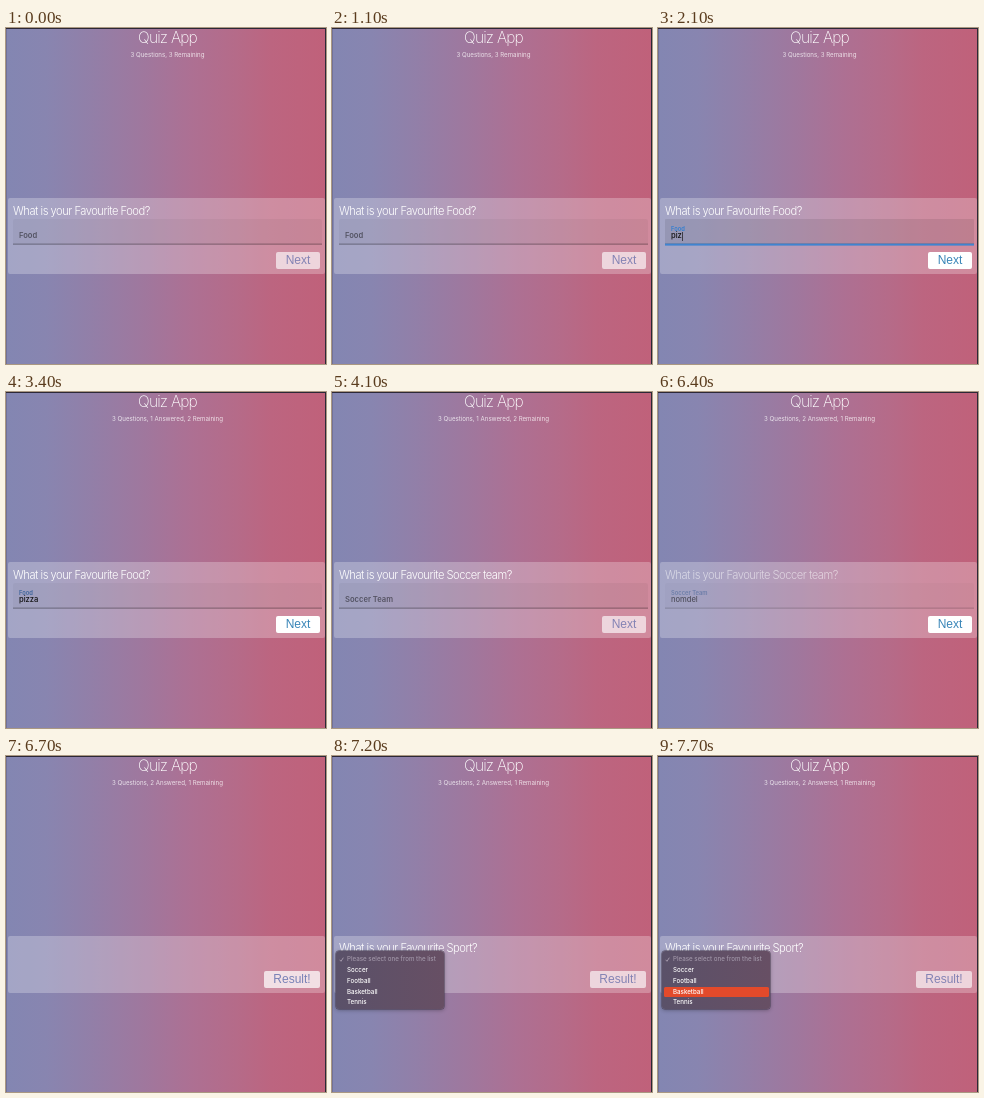
An HTML page for the animation above (8000 ms loop, 320 by 336 pixels).

```html
<!DOCTYPE html>
<html lang="en">
<head>
<meta charset="utf-8">
<title>Quiz App</title>
<style>
  html, body { margin: 0; width: 100%; height: 100%; overflow: hidden; }
  body { font-family: Inter, "Open Sans", sans-serif; color: #fff; }
  .stage {
    position: relative; width: 320px; height: 336px; overflow: hidden;
    background: linear-gradient(90deg, #8386b2 0, #8885b0 40px, #927fa8 85px, #a0779d 140px,
      #ad7093 185px, #b56b89 230px, #bc6580 265px, #c0617a 320px);
  }
  .edge { inset: 0; border: solid #2c2836; border-width: 1px 1px 0 0; box-shadow: inset 1px 0 #55526f66; }
  .stage * { position: absolute; white-space: pre; box-sizing: border-box; }
  h1, p { margin: 0; left: 0; width: 323px; text-align: center; }
  h1 { top: 0; font-size: 15.5px; line-height: 20px; font-weight: 200; letter-spacing: -.8px; }
  p { top: 21.5px; font-size: 6.15px; line-height: 10px; font-weight: 400; opacity: .78; }

  .card { left: 2px; top: 170px; width: 317px; height: 76px; border-radius: 2px; background: #ffffff42; }
  .card.short { top: 180px; height: 57px; }

  .scene { inset: 0; animation: 8s linear infinite; }
  .first { animation-name: first; }
  .second { animation-name: second; --delay: 2.85s; }
  .third { animation-name: third; }
  .ask { left: 7px; top: 176px; font-size: 11.2px; line-height: 14px; font-weight: 300; letter-spacing: -.5px; }
  .third .ask { top: 184.5px; }

  .field { left: 7px; top: 191px; width: 309px; height: 26px; background: #0000000a; border-radius: 2px 2px 0 0; }
  .field * { animation: 8s cubic-bezier(.25, .8, .25, 1) var(--delay, 0s) infinite backwards; }
  .tint { inset: 0; background: #000; opacity: 0; animation-name: tint; }
  .rule { left: 0; right: 0; top: 24px; height: 1px; background: #00000058; transform: translateY(.6px); }
  .focus { left: 0; right: 0; top: 24px; height: 2px; background: #3f84d0; opacity: 0; animation-name: focus; }
  .label, .answer { left: 6px; top: 11.5px; font-size: 7.6px; line-height: 10px; }
  .label { font-weight: 600; color: #0000007a; transform-origin: 0 50%; animation-name: float; }
  .answer { color: #111; font-weight: 500; letter-spacing: -.05px; }
  .answer.caret::after { content: ""; position: absolute; right: -1px; top: 1px; width: 1px; height: 9px; background: #111a; }

  .button {
    right: 6px; top: 224px; width: 44px; height: 17px; border-radius: 2px;
    background: #fff; color: #3a86b8; text-align: center;
    font: 12px/17.5px "Liberation Sans", Arial, sans-serif; transition: opacity .15s;
  }
  .button.off { opacity: .64; color: #5a7fc0; }
  .button.result { top: 215px; width: 56px; }

  .select { left: 7px; top: 198px; font-size: 6.2px; line-height: 10px; padding-left: 8px; }
  .menu {
    left: 4px; top: 195px; width: 108px; height: 58px; border-radius: 3px; visibility: hidden;
    background: linear-gradient(90deg, #5a5169, #674f64);
    box-shadow: 0 0 0 .5px #4a4055, 0 1px 4px #0005;
  }
  .menu.open { visibility: visible; }
  .menu span {
    left: 1.5px; right: 1.5px; height: 10.8px; padding-left: 9.5px; border-radius: 1.5px;
    font-size: 6.2px; line-height: 10.8px; font-weight: 500;
  }
  .menu .hint { color: #a196a8; }
  .menu .hot { background: #e34a2b; }
  .tick { left: 3px; top: 6px; width: 5px; height: 5px; fill: none; stroke: #a196a8; }

  @keyframes first { 0%, 42.5% { opacity: 1; } 46.8%, 99.9% { opacity: 0; } 100% { opacity: 1; } }
  @keyframes second { 0%, 48.4% { opacity: 0; } 50.9%, 78.2% { opacity: 1; } 82.4%, 100% { opacity: 0; } }
  @keyframes third { 0%, 84% { opacity: 0; } 86.5%, 99.9% { opacity: 1; } 100% { opacity: 0; } }
  @keyframes tint { 0%, 17.5% { opacity: 0; } 21.25%, 40.6% { opacity: .05; } 42.5%, 100% { opacity: 0; } }
  @keyframes focus {
    0%, 17.5% { opacity: 0; transform: translateY(.6px) scaleX(.5); }
    21.25%, 40.6% { opacity: 1; transform: translateY(.6px); }
    42.5%, 100% { opacity: 0; transform: translateY(.6px); }
  }
  @keyframes float {
    0%, 17.5% { transform: none; color: #0000007a; }
    21.25%, 40.6% { transform: translateY(-7px) scale(.76); color: #2f7cd0; }
    46%, 99.9% { transform: translateY(-7px) scale(.76); color: #3f5f92; }
    100% { transform: none; color: #0000007a; }
  }
</style>
</head>
<body>
<div class="stage">
  <div class="edge"></div>
  <h1>Quiz App</h1>
  <p id="status"></p>
  <div class="card" id="card"></div>

  <div class="scene first">
    <div class="ask">What is your Favourite Food?</div>
    <div class="field">
      <i class="tint"></i><i class="rule"></i><i class="focus"></i>
      <span class="label">Food</span><span class="answer" id="food"></span>
    </div>
  </div>

  <div class="scene second">
    <div class="ask">What is your Favourite Soccer team?</div>
    <div class="field">
      <i class="tint"></i><i class="rule"></i><i class="focus"></i>
      <span class="label">Soccer Team</span><span class="answer" id="team"></span>
    </div>
  </div>

  <div class="scene third">
    <div class="ask">What is your Favourite Sport?</div>
    <div class="select">Please select one from the list</div>
  </div>

  <div class="button" id="button"></div>
  <div class="menu" id="menu"><svg class="tick" viewBox="0 0 5 5"><path d="M.7 2.8 2 4.3 4.3.7"/></svg></div>
</div>

<script>
  const LOOP = 8000;
  const SWAP = [3750, 6620];
  const $ = id => document.getElementById(id);
  const status = $('status'), card = $('card'), button = $('button'), menu = $('menu');

  const answers = [
    { el: $('food'), text: 'pizza', focus: 1400, blur: 3250, keys: [1800, 1950, 2100, 2200, 2300] },
    { el: $('team'), text: 'nomdel', focus: 4250, blur: 6100, keys: [4700, 4900, 5050, 5250, 5400, 5590] }
  ];

  const options = ['Please select one from the list', 'Soccer', 'Football', 'Basketball', 'Tennis']
    .map((name, i) => {
      const row = document.createElement('span');
      row.textContent = name;
      row.style.top = 3.2 + i * 10.8 + 'px';
      row.classList.toggle('hint', i === 0);
      menu.append(row);
      return row;
    });

  const count = (list, t) => list.filter(at => t >= at).length;

  function type({ el, text, focus, blur, keys }, t) {
    const typed = count(keys, t);
    const since = t - (typed ? keys[typed - 1] : focus);
    el.textContent = text.slice(0, typed) || '\u200b';
    el.classList.toggle('caret', t >= focus && t < blur && since % 1000 < 500);
  }

  function render(t) {
    const answered = count([3300, 6250], t);
    status.textContent = '3 Questions, ' + (answered ? answered + ' Answered, ' : '') + (3 - answered) + ' Remaining';

    answers.forEach(a => type(a, t));

    const step = count(SWAP, t), last = step === 2;
    card.classList.toggle('short', last);
    button.classList.toggle('result', last);
    button.classList.toggle('off', last || t < answers[step].keys[0]);
    button.textContent = last ? 'Result!' : 'Next';

    const hover = count([7400, 7500, 7600], t);
    menu.classList.toggle('open', t >= 7100);
    options.forEach((row, i) => row.classList.toggle('hot', i > 0 && i === hover));
  }

  const start = performance.now();
  function tick() {
    render((performance.now() - start) % LOOP);
    requestAnimationFrame(tick);
  }
  tick();
</script>
</body>
</html>
```
